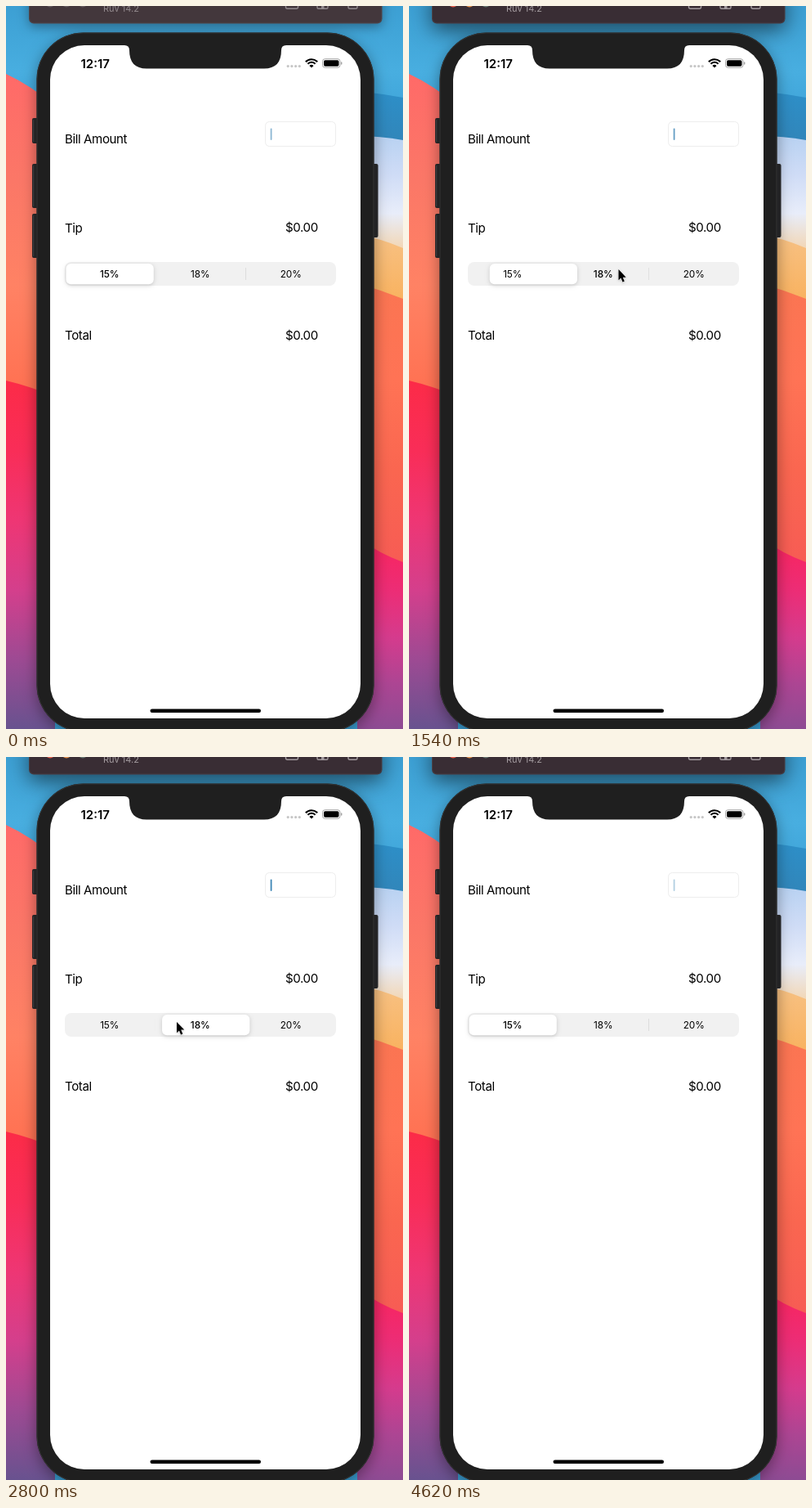
Recreate the animation shown at these times as an HTML page with a canvas. Size 486 by 884 pixels, loop 4690 ms.

```html
<!DOCTYPE html>
<html lang="en">
<head>
<meta charset="utf-8">
<title>Tip calculator</title>
<style>
html, body { margin: 0; width: 100%; height: 100%; overflow: hidden; background: #1f1f1f; }
canvas { display: block; width: 486px; height: 884px; }
</style>
</head>
<body>
<canvas id="stage" width="486" height="884"></canvas>
<script>
const ctx = document.getElementById('stage').getContext('2d');
const W = 486, H = 884, LOOP = 4690, STEP = 70;
const ACTIVATED = 1470, CARET_PERIOD = 1040;
const FONT = 'Inter, "Liberation Sans", sans-serif';

// time, x, y of the pointer tip
const POINTER = [
  [250, 300, 900], [640, 267, 278], [760, 267, 278], [1250, 253, 322],
  [1500, 253, 322], [1820, 334, 323], [2090, 334, 323], [2450, 209, 324],
  [2820, 209, 324], [3250, 140, 327], [3520, 140, 327], [4050, 170, 900]
];
// time of each tap and the segment it selects
const TAPS = [[1490, 1], [1922, 2], [2550, 1], [3460, 0]];
const SEGMENTS = ['15%', '18%', '20%'];
const segmentX = i => 73.5 + 110.8 * i;

const clamp = v => Math.max(0, Math.min(1, v));
const mix = (a, b, k) => a + (b - a) * k;
const smooth = k => k * k * (3 - 2 * k);
const spring = ms => {
  const k = Math.max(0, ms) * 0.018;
  return 1 - (1 + k) * Math.exp(-k);
};

function box(x, y, w, h, r, fill, stroke) {
  ctx.beginPath();
  ctx.roundRect(x, y, w, h, r);
  if (fill) { ctx.fillStyle = fill; ctx.fill(); }
  if (stroke) { ctx.strokeStyle = stroke; ctx.stroke(); }
}

function disc(x, y, r, fill) {
  ctx.beginPath();
  ctx.arc(x, y, r, 0, Math.PI * 2);
  ctx.fillStyle = fill;
  ctx.fill();
}

function shape(points, fill) {
  ctx.beginPath();
  points.forEach(([x, y]) => ctx.lineTo(x, y));
  ctx.closePath();
  ctx.fillStyle = fill;
  ctx.fill();
}

function text(str, x, y, size, { weight = 400, color = '#000', align = 'left', spacing = 0 } = {}) {
  ctx.font = `${weight} ${size}px ${FONT}`;
  ctx.letterSpacing = spacing + 'px';
  ctx.textAlign = align;
  ctx.fillStyle = color;
  ctx.fillText(str, x, y);
}

function vertical(y0, y1, ...colors) {
  const g = ctx.createLinearGradient(0, y0, 0, y1);
  colors.forEach((c, i) => g.addColorStop(i / (colors.length - 1), c));
  return g;
}

function withShadow(color, blur, dy, draw) {
  ctx.save();
  ctx.shadowColor = color;
  ctx.shadowBlur = blur;
  ctx.shadowOffsetY = dy;
  draw();
  ctx.restore();
}

// A band of wallpaper from a slanted top edge down to the stage bottom.
function band(x0, x1, yLeft, yMid, yRight, fill) {
  ctx.beginPath();
  ctx.moveTo(x0, yLeft);
  ctx.quadraticCurveTo((x0 + x1) / 2, yMid, x1, yRight);
  ctx.lineTo(x1, H);
  ctx.lineTo(x0, H);
  ctx.fillStyle = fill;
  ctx.fill();
}

function wallpaper() {
  ctx.fillStyle = vertical(0, 160, '#3c9fd3', '#48aee0', '#3a9fd5');
  ctx.fillRect(0, 0, W, H);
  band(0, 60, 83, 97, 122, vertical(85, 470, '#ff6a68', '#fb7767', '#ff8264', '#ff7152'));
  band(0, 60, 458, 465, 478,
    vertical(460, H, '#fc2b48', '#f92d58', '#ee3674', '#d43f8c', '#9d4a93', '#68528f'));
  band(430, W, 104, 107, 112, vertical(105, 165, '#2d8fc8', '#3186ba'));
  band(430, W, 159, 159, 164, vertical(160, 300, '#b9d2f2', '#cfdcf6', '#e8edfa', '#f3d5b0'));
  band(430, W, 279, 284, 296, vertical(280, 360, '#f7c183', '#f9b25f'));
  band(430, W, 339, 347, 358, vertical(345, 680, '#fb7552', '#ff7355', '#fa6650', '#f75c54'));
  band(430, W, 650, 670, 680,
    vertical(660, H, '#f82561', '#ec2d76', '#d53b8d', '#ad4593', '#8d4b93'));
}

function windowBar(active) {
  withShadow(active ? 'rgba(0,0,0,.55)' : 'rgba(0,0,0,.35)', active ? 26 : 14, active ? 8 : 4, () =>
    box(28, -20, 432.5, 41.5, 6, active ? '#392d34' : '#43373c'));
  ctx.lineWidth = 1;
  box(28.5, -20, 431.5, 41, 6, null, 'rgba(255,255,255,.08)');
  const lights = active ? ['#ec5f4d', '#e8924c', '#687872'] : ['#655c60', '#655c60', '#655c60'];
  lights.forEach((c, i) => disc(54 + 20 * i, -4.5, 6, c));
  const gray = active ? '#a29a9e' : '#92898d';
  text('Ruv 14.2', 119, 7, 11, { color: gray });
  ctx.lineWidth = 1.4;
  box(342.5, -9, 15, 12.3, 2, null, gray);
  box(347, -3, 6, 3, 0, gray);
  box(381, -8, 13, 11.3, 1.5, null, gray);
  box(386, -2, 3.5, 5, 0, gray);
  box(419, -9, 11, 12.3, 2, null, gray);
}

function sideButton(x, y, w, h) {
  box(x, y, w, h, 2, '#29292b');
  box(x + 1, y + 2, 1.2, h - 4, 1, '#454548');
}

function phone() {
  [[137, 31], [193, 54], [254, 54]].forEach(([y, h]) => sideButton(32, y, 8, h));
  sideButton(448, 193, 7.5, 90);
  withShadow('rgba(0,0,0,.38)', 18, 5, () => box(37.5, 32.5, 413, 855, 57, '#1f1f1f'));
  ctx.lineWidth = 1;
  box(38, 33, 412, 854, 56.5, null, '#343434');
  box(54, 48, 380, 823, 42, '#fff');

  ctx.beginPath();
  ctx.moveTo(145, 47);
  ctx.lineTo(145, 48);
  ctx.quadraticCurveTo(151, 48, 151, 54);
  ctx.bezierCurveTo(151, 69, 158, 76.5, 172, 76.5);
  ctx.lineTo(316, 76.5);
  ctx.bezierCurveTo(330, 76.5, 337, 69, 337, 54);
  ctx.quadraticCurveTo(337, 48, 343, 48);
  ctx.lineTo(343, 47);
  ctx.fillStyle = '#1f1f1f';
  ctx.fill();
  box(176.5, 859.5, 135.5, 4.5, 2.25, '#000');
}

function statusBar() {
  text('12:17', 91.5, 75.5, 15, { weight: 600 });
  for (let i = 0; i < 4; i++) disc(345.2 + 4.7 * i, 73.6, 1.6, '#c6c6c6');
  ctx.strokeStyle = '#000';
  ctx.lineWidth = 2.1;
  [9.8, 6.3].forEach(r => {
    ctx.beginPath();
    ctx.arc(374, 75, r, -Math.PI * 0.76, -Math.PI * 0.24);
    ctx.stroke();
  });
  ctx.beginPath();
  ctx.moveTo(374, 75.5);
  ctx.arc(374, 75.5, 3.6, -Math.PI * 0.76, -Math.PI * 0.24);
  ctx.fillStyle = '#000';
  ctx.fill();
  ctx.lineWidth = 1;
  box(387.5, 64.7, 21.5, 10.6, 3, null, '#a4a4a4');
  box(389, 66.2, 18.5, 7.6, 1.8, '#000');
  box(410, 68.2, 1.4, 3.6, 0.7, '#a4a4a4');
}

function caretAlpha(t) {
  const p = t % CARET_PERIOD;
  return p < 300 ? clamp(0.6 - p / 110) : clamp((p - 420) / 100);
}

function form(t) {
  const label = { spacing: -0.4 };
  text('Bill Amount', 72, 168, 15.1, label);
  text('Tip', 72, 277, 15.1, label);
  text('$0.00', 342, 276.3, 15.1, label);
  text('Total', 72, 408, 15.1, label);
  text('$0.00', 342, 408, 15.1, label);
  ctx.lineWidth = 1;
  box(317.5, 141.5, 86, 30, 5, '#fff', '#ededed');
  ctx.globalAlpha = caretAlpha(t);
  box(323.7, 149.5, 1.8, 14.5, 0.9, '#3d86b5');
  ctx.globalAlpha = 1;
}

function segmentState(t) {
  let thumb = segmentX(0), selected = 0, previous = 0, k = 1;
  for (const [time, index] of TAPS) {
    if (t < time) break;
    k = spring(t - time);
    thumb = mix(thumb, segmentX(index), k);
    previous = selected;
    selected = index;
  }
  return { thumb, selected, previous, k };
}

function segments(t) {
  const { thumb, selected, previous, k } = segmentState(t);
  box(72, 313, 332, 29, 8, '#f1f1f1');
  [0, 1].forEach(i => {
    const visible = s => s !== i && s !== i + 1 ? 1 : 0;
    ctx.globalAlpha = mix(visible(previous), visible(selected), k);
    box(182 + 111 * i, 320, 1, 15, 0, '#dcdcdc');
  });
  ctx.globalAlpha = 1;
  withShadow('rgba(0,0,0,.18)', 5, 1.5, () => box(thumb, 315, 107.3, 25.3, 6, '#fff'));
  SEGMENTS.forEach((name, i) =>
    text(name, 126.7 + 111 * i, 332, 11.8, { weight: i === selected ? 500 : 400, align: 'center', spacing: -0.1 }));
}

function pointer(t) {
  const next = POINTER.findIndex(p => p[0] > t);
  if (next < 1) return;
  const [t0, x0, y0] = POINTER[next - 1];
  const [t1, x1, y1] = POINTER[next];
  const k = smooth((t - t0) / (t1 - t0));
  const arrow = [[0, 0], [0, 13.2], [3, 10.5], [5.1, 15.4], [7.3, 14.5], [5.2, 9.6], [9.2, 9.6]];
  ctx.save();
  ctx.translate(mix(x0, x1, k), mix(y0, y1, k));
  withShadow('rgba(0,0,0,.3)', 3, 1, () => shape(arrow, '#fff'));
  shape(arrow, '#000');
  ctx.lineWidth = 1;
  ctx.lineJoin = 'round';
  ctx.strokeStyle = '#fff';
  ctx.stroke();
  shape(arrow, '#000');
  ctx.restore();
}

function draw(t) {
  wallpaper();
  windowBar(t >= ACTIVATED);
  phone();
  statusBar();
  form(t);
  segments(t);
  pointer(t);
}

const start = performance.now();
function tick() {
  const t = (performance.now() - start) % LOOP;
  draw(Math.floor(t / STEP) * STEP);
  requestAnimationFrame(tick);
}
tick();
</script>
</body>
</html>
```
